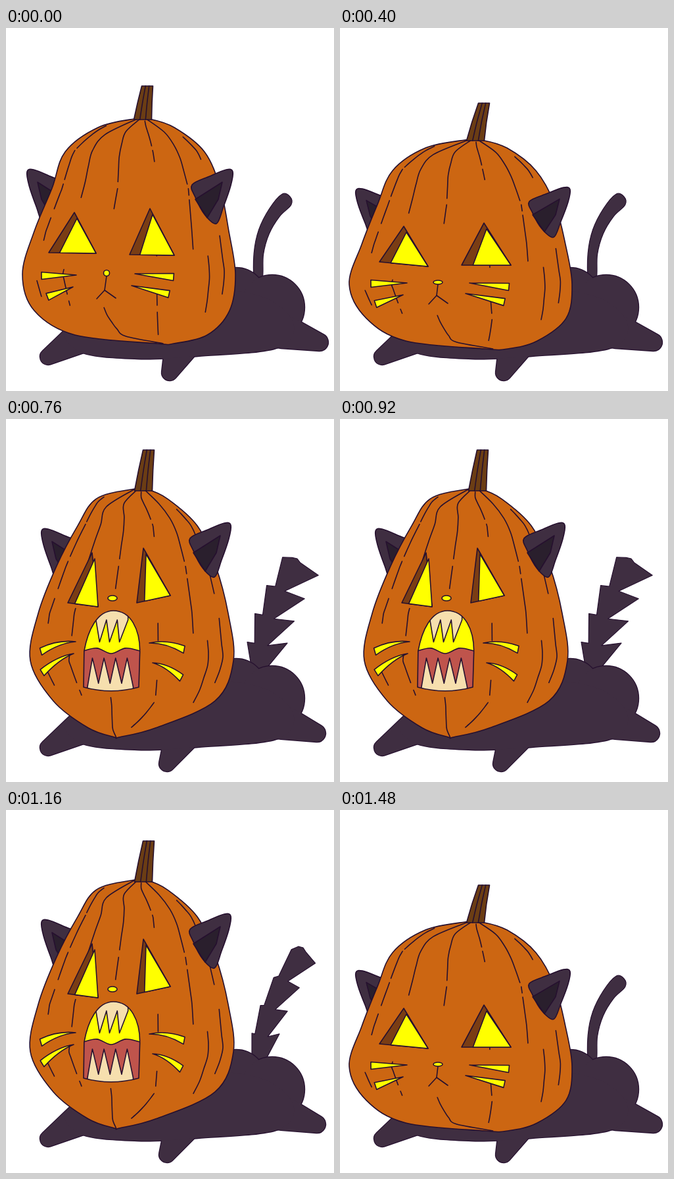
Write an HTML page with a canvas that moves like this. It is 499 by 551 pixels and loops after 1560 ms.

```html
<!DOCTYPE html>
<html lang="en">
<head>
<meta charset="utf-8">
<title>Pumpkin cat</title>
<style>
html, body { margin: 0; width: 100%; height: 100%; overflow: hidden; background: #fff; }
canvas { display: block; width: 499px; height: 551px; }
</style>
</head>
<body>
<canvas id="stage" width="499" height="551"></canvas>
<script>
const ctx = document.getElementById('stage').getContext('2d');
const INK = '#26102f', FUR = '#3f2e41', ORANGE = '#cc6612', YELLOW = '#ffff00',
  BROWN = '#7a3d14', STEM = '#6b3d14', CREAM = '#f6dfae', RED = '#bf544c', INNER = '#2a1f2d';

// left and right: head edges at nine levels from top to bottom.
// eyes: outer corner, apex, inner corner. whiskers: tip, end. mouth: x, y, width, height.
const rest = {
  span: [138, 479], open: 0,
  left: [195, 140, 90, 70, 43, 25, 43, 105, 230],
  right: [218, 256, 302, 326, 339, 349, 340, 306, 255],
  stem: [[208, 139], [215, 88]],
  ears: [[32, 217, 1], [345, 217, 1]],
  eyes: [[[65, 341], [104, 280], [137, 342]], [[188, 344], [219, 274], [256, 345]]],
  nose: [153, 372, 4.5, 4.5],
  whiskers: [[107, 375, 54, 376], [102, 393, 63, 408], [196, 373, 255, 378], [191, 391, 248, 404]],
  mouth: [150, 398, 0, 0]
};
const squash = {
  span: [170, 487], open: 0,
  left: [190, 130, 80, 57, 33, 14, 40, 100, 220],
  right: [215, 254, 298, 327, 343, 353, 344, 300, 255],
  stem: [[206, 171], [219, 114]],
  ears: [[24, 246, 0.92], [350, 244, 0.92]],
  eyes: [[[60, 355], [97, 301], [134, 362]], [[185, 360], [219, 296], [260, 360]]],
  nose: [149, 386, 7, 3],
  whiskers: [[102, 387, 47, 388], [96, 405, 54, 419], [197, 387, 257, 393], [191, 403, 250, 416]],
  mouth: [147, 406, 0, 0]
};
const tall = {
  span: [75, 485], open: 1,
  left: [195, 149, 112, 92, 70, 55, 96, 123, 165],
  right: [215, 248, 289, 308, 326, 333, 305, 220, 172],
  stem: [[210, 75], [220, 10]],
  ears: [[73, 143, 1], [330, 130, 1.22]],
  eyes: [[[106, 262], [141, 177], [147, 270]], [[203, 262], [209, 175], [248, 251]]],
  nose: [170, 256, 4.5, 5.5],
  whiskers: [[119, 322, 70, 342], [115, 343, 76, 378], [218, 326, 267, 338], [221, 355, 261, 382]],
  mouth: [168, 272, 78, 127]
};
const roar = {
  span: [107, 483], open: 1,
  left: [190, 137, 109, 77, 49, 37, 72, 125, 165],
  right: [215, 246, 291, 319, 338, 346, 318, 228, 172],
  stem: [[209, 109], [217, 47]],
  ears: [[54, 169, 1], [342, 160, 1]],
  eyes: [[[94, 279], [131, 203], [140, 285]], [[199, 279], [209, 196], [250, 268]]],
  nose: [162, 272, 7, 4],
  whiskers: [[106, 338, 53, 353], [103, 356, 55, 385], [218, 340, 271, 350], [223, 370, 267, 393]],
  mouth: [160, 291, 84, 116]
};

// Position across the head, then start and end heights of each dash.
const seams = [
  [0.06, 0.03, 0.13, 0.14, 0.27, 0.29, 0.4, 0.44, 0.54, 0.72, 0.79],
  [0.19, 0, 0.35, 0.48, 0.59, 0.67, 0.78, 0.81, 0.83],
  [0.39, 0, 0.28, 0.31, 0.4],
  [0.36, 0.84, 1],
  [0.63, 0.01, 0.12, 0.14, 0.19, 0.54, 0.61, 0.77, 0.83, 0.86, 0.96],
  [0.81, 0, 0.29, 0.31, 0.34, 0.36, 0.58],
  [0.88, 0.61, 0.86],
  [0.95, 0.08, 0.18, 0.34, 0.42, 0.52, 0.78]
];

const tails = {
  calm: { end: [432, 256] },
  bristle: { end: [448, 234], left: 1, right: 6 },
  wide: { end: [443, 212], left: 15, right: 40 },
  lean: { end: [452, 209], left: 8, right: 28 }
};

const mix = (a, b, w) => a + (b - a) * w;
const mixPt = (a, b, w) => [mix(a[0], b[0], w), mix(a[1], b[1], w)];

function blend(a, b, w) {
  if (typeof a === 'number') return mix(a, b, w);
  if (Array.isArray(a)) return a.map((v, i) => blend(v, b[i], w));
  return Object.fromEntries(Object.keys(a).map(k => [k, blend(a[k], b[k], w)]));
}

function straight(p, closed = true) {
  ctx.beginPath();
  p.forEach(q => ctx.lineTo(...q));
  if (closed) ctx.closePath();
}

function smooth(p, closed = true) {
  const n = p.length;
  const at = i => closed ? p[(i + n) % n] : p[Math.max(0, Math.min(n - 1, i))];
  ctx.beginPath();
  ctx.moveTo(...p[0]);
  for (let i = 0; i < (closed ? n : n - 1); i++) {
    const [a, b, c, d] = [at(i - 1), at(i), at(i + 1), at(i + 2)];
    ctx.bezierCurveTo(b[0] + (c[0] - a[0]) / 6, b[1] + (c[1] - a[1]) / 6,
      c[0] - (d[0] - b[0]) / 6, c[1] - (d[1] - b[1]) / 6, ...c);
  }
  if (closed) ctx.closePath();
}

function paint(fill, width = 1.6) {
  if (fill) { ctx.fillStyle = fill; ctx.fill(); }
  ctx.lineWidth = width;
  if (width) ctx.stroke();
}

// Two circles joined by their outer tangents.
function limb(x1, y1, r1, x2, y2, r2) {
  const dir = Math.atan2(y2 - y1, x2 - x1);
  const lean = Math.acos((r1 - r2) / Math.hypot(x2 - x1, y2 - y1));
  ctx.beginPath();
  ctx.arc(x1, y1, r1, dir + lean, dir - lean);
  ctx.arc(x2, y2, r2, dir - lean, dir + lean);
  ctx.closePath();
}

function drawBody(open) {
  const shift = 4 * (1 - open);
  const parts = [
    () => { ctx.beginPath(); ctx.arc(350, 410, 46, 0, 7); },
    () => { ctx.beginPath(); ctx.arc(405, 424, 49, 0, 7); },
    () => limb(120, 465, 26, 64, 499, 12),
    () => limb(268, 480, 26, 245 + shift, 523, 12),
    () => limb(420, 460, 26, 473 + shift, 477, 13),
    () => smooth([[100, 450], [112, 491], [200, 502], [292, 498], [414, 485], [436, 445], [380, 405], [250, 400]])
  ];
  parts.forEach(part => { part(); paint(null, 2.4); });
  parts.forEach(part => { part(); paint(FUR, 0); });
}

function drawTail({ end, left, right }) {
  const base = [384, 381], bend = [left === undefined ? 377 : 386, 300];
  const side = (t, out, ahead = 0) => {
    const a = mixPt(base, bend, t), b = mixPt(bend, end, t), p = mixPt(a, b, t);
    const dx = b[0] - a[0], dy = b[1] - a[1], len = Math.hypot(dx, dy);
    return [p[0] + (dx * ahead - dy * out) / len, p[1] + (dy * ahead + dx * out) / len];
  };
  if (left === undefined) {
    const ts = [0, 0.25, 0.5, 0.75, 0.95];
    smooth([...ts.map(t => side(t, -6 - 5 * t)), end, ...ts.reverse().map(t => side(t, 6 + 5 * t))]);
  } else {
    const edge = (dir, spike) => [side(0, dir * 10), ...[0, 1, 2, 3].flatMap(k =>
      [side(k / 4, dir * (spike + 3), 42), side((k + 0.95) / 4, dir * (10 - k))])];
    straight([...edge(-1, left), end, ...edge(1, right).reverse()]);
  }
  paint(FUR, 1.2);
}

function drawEar([x, y, s], dir) {
  const place = p => p.map(([u, v]) => [x + dir * u, y + v * s]);
  smooth(place([[-62, 21], [-35, 8], [-10, -2], [0, 1], [-3, 22], [-14, 54], [-25, 80], [-43, 66], [-57, 40]]));
  paint(FUR);
  straight(place([[-57, 43], [-16, 17], [-22, 43], [-39, 71]]));
  paint(INNER);
}

function drawHead({ span, left, right }) {
  const level = k => mix(span[0], span[1], (1 - Math.cos(Math.PI * k / 8)) / 2);
  const side = xs => xs.map((x, k) => [x, level(k)]);
  smooth([...side(right), ...side(left).reverse()]);
  paint(ORANGE);

  const edge = (xs, v) => {
    const k = Math.acos(1 - 2 * v) / Math.PI * 8, i = Math.min(7, Math.floor(k));
    return mix(xs[i], xs[i + 1], k - i);
  };
  for (const [u, ...cuts] of seams)
    for (let i = 0; i < cuts.length; i += 2) {
      const line = Array.from({ length: 6 }, (_, j) => {
        const v = mix(cuts[i], cuts[i + 1], j / 5);
        return [mix(edge(left, v), edge(right, v), u), mix(span[0], span[1], v)];
      });
      smooth(line, false);
      paint();
    }
}

function drawStem([[bx, by], [tx, ty]]) {
  const rib = f => [[bx + 27 * f, by], [mix(bx, tx, 0.45) + 22 * f, mix(by, ty, 0.5)], [tx + 17 * f, ty]];
  straight([...rib(-0.5), ...rib(0.5).reverse()]);
  paint(STEM);
  for (const f of [-0.16, 0.16]) { smooth(rib(f), false); paint(); }
}

function drawEye([outer, apex, inner]) {
  const notch = [apex[0] + 4, apex[1] + 9], foot = mixPt(outer, inner, 0.23);
  straight([outer, apex, inner]); paint(BROWN);
  straight([notch, foot, inner]); paint(YELLOW);
}

function drawWhisker([x, y, ex, ey], open) {
  const len = Math.hypot(ex - x, ey - y), dir = Math.sign(ex - x);
  const nx = -(ey - y) / len * dir * 5.5, ny = (ex - x) / len * dir * 5.5;
  const mx = (x + ex) / 2, my = (y + ey) / 2 - 8 * open;
  ctx.beginPath();
  ctx.moveTo(x, y);
  ctx.quadraticCurveTo(mx - nx / 2, my - ny / 2, ex - nx, ey - ny);
  ctx.lineTo(ex + nx, ey + ny);
  ctx.quadraticCurveTo(mx + nx / 2, my + ny / 2, x, y);
  paint(YELLOW);
}

function drawMouth([x, y, w, h], nose) {
  if (h < 30) {
    straight([[x - 12, y + 13], [x, y], [x + 17, y + 12]], false); paint();
    straight([[nose[0], nose[1] + nose[3]], [x, y]], false); paint();
    return;
  }
  const at = (u, v) => [x + u * w, y + v * h];
  const arch = () => {
    ctx.beginPath();
    ctx.moveTo(...at(-0.5, 1));
    ctx.lineTo(...at(-0.49, 0.53));
    ctx.bezierCurveTo(...at(-0.42, 0.25), ...at(-0.25, 0), ...at(0.04, 0));
    ctx.bezierCurveTo(...at(0.36, 0), ...at(0.52, 0.25), ...at(0.52, 0.53));
    ctx.lineTo(...at(0.5, 1));
    ctx.quadraticCurveTo(...at(0, 1.1), ...at(-0.5, 1));
    ctx.closePath();
  };
  arch(); paint(YELLOW, 0);
  ctx.save();
  ctx.clip();
  const fangs = [0, 1, 2].flatMap(i => [at(-0.21 + 0.18 * i, 0.41), at(-0.085 + 0.195 * i, 0.12)]);
  straight([at(-0.28, 0.1), ...fangs, at(0.31, -0.1), at(-0.28, -0.1)]);
  paint(CREAM);
  smooth([at(-0.52, 0.53), at(-0.26, 0.49), at(0, 0.56), at(0.26, 0.49), at(0.54, 0.53)], false);
  ctx.lineTo(...at(0.54, 1.2));
  ctx.lineTo(...at(-0.52, 1.2));
  paint(RED);
  const teeth = [0, 1, 2, 3].flatMap(i => [at(-0.34 + 0.21 * i, 0.62), at(-0.23 + 0.21 * i, 0.95)]);
  straight([at(-0.43, 1), ...teeth.slice(0, -1), at(0.4, 1), at(0.4, 1.2), at(-0.43, 1.2)]);
  paint(CREAM);
  ctx.restore();
  arch(); paint();
}

function draw(pose, tail) {
  ctx.fillStyle = '#fff';
  ctx.fillRect(0, 0, 499, 551);
  ctx.strokeStyle = INK;
  ctx.lineJoin = ctx.lineCap = 'round';
  drawTail(tail);
  drawBody(pose.open);
  drawEar(pose.ears[0], -1);
  drawHead(pose);
  drawStem(pose.stem);
  drawEar(pose.ears[1], 1);
  pose.eyes.forEach(drawEye);
  pose.whiskers.forEach(w => drawWhisker(w, pose.open));
  drawMouth(pose.mouth, pose.nose);
  ctx.beginPath();
  ctx.ellipse(...pose.nose, 0, 0, 7);
  paint(YELLOW);
}

const LOOP = 1560;
const keys = [[0, rest], [400, squash], [560, tall], [760, roar], [1320, roar], [1480, squash], [LOOP, rest]];

function poseAt(t) {
  const i = keys.findIndex(k => k[0] > t) - 1;
  const [[t0, a], [t1, b]] = [keys[i], keys[i + 1]];
  const w = (t - t0) / (t1 - t0);
  return blend(a, b, w * w * (3 - 2 * w));
}

function tailAt(t) {
  if (t < 480 || t >= 1480) return tails.calm;
  if (t < 680 || t >= 1400) return tails.bristle;
  return (t - 680) / 80 % 2 ? tails.wide : tails.lean;
}

// Drawn in 80 ms steps; the tallest pose holds for 120.
function stepTime(t) {
  if (t >= 560 && t < 680) return 560;
  const from = t < 560 ? 0 : 680;
  return from + Math.floor((t - from) / 80) * 80;
}

let shown = -1;
const start = performance.now();
function tick() {
  const t = stepTime((performance.now() - start) % LOOP);
  if (t !== shown) draw(poseAt(t), tailAt(t));
  shown = t;
  requestAnimationFrame(tick);
}
tick();
</script>
</body>
</html>
```
